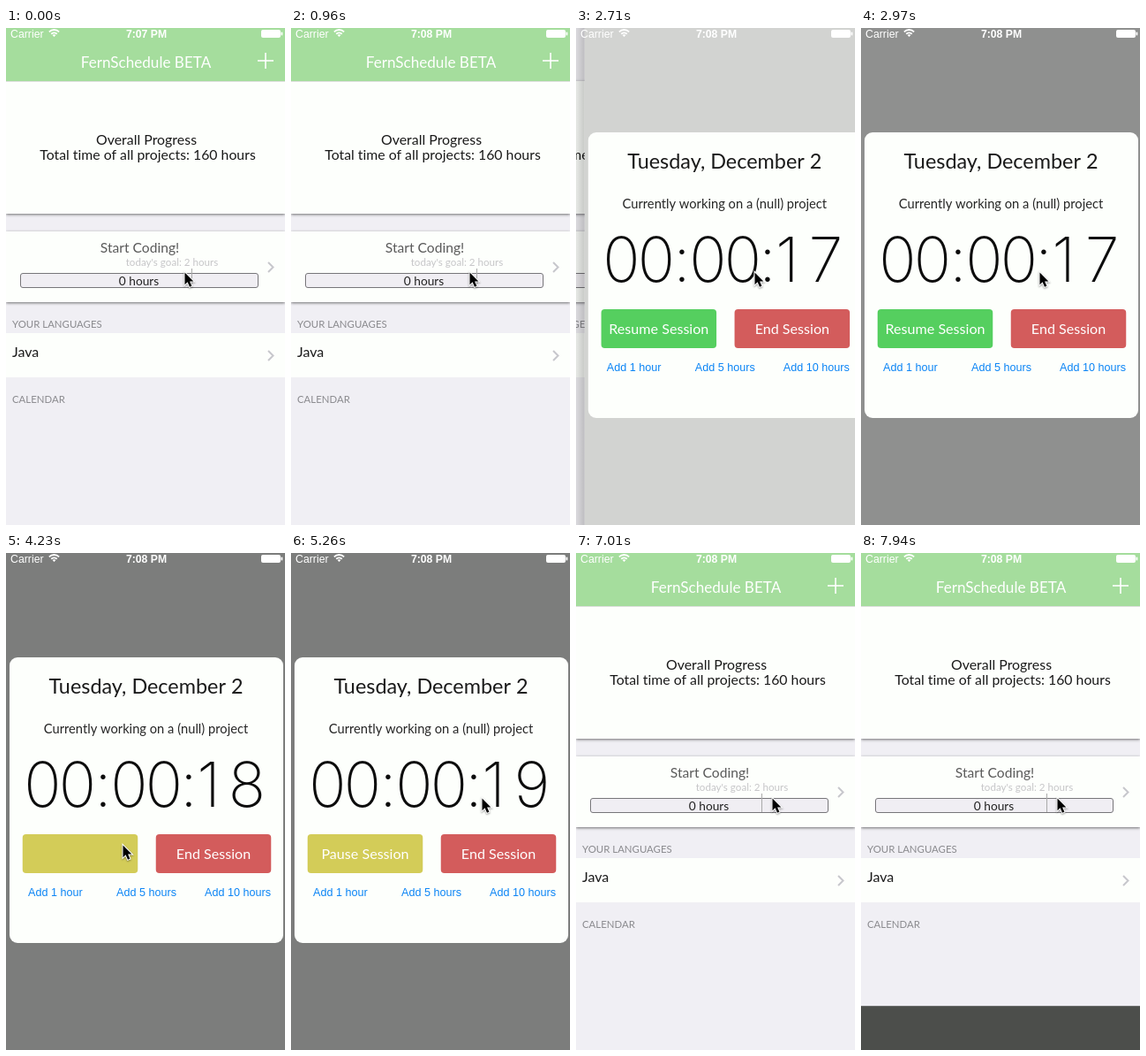
Recreate the animation shown at these times as an HTML page with a canvas. Size 316 by 562 pixels, loop 8 s.

```html
<!DOCTYPE html>
<html lang="en">
<head>
<meta charset="utf-8">
<title>Session timer</title>
<style>
html, body { margin: 0; width: 100%; height: 100%; overflow: hidden; background: #efeff4; }
canvas { display: block; width: 316px; height: 562px; }
</style>
</head>
<body>
<canvas id="stage"></canvas>
<script>
const W = 316, H = 562, LOOP = 8000;
const PUSH = 2420, POP = 6490;
const LATO = 'Lato, "Open Sans", sans-serif';
const ARIAL = '"Liberation Sans", Arial, sans-serif';
const PAPER = '#fdfffc';

const canvas = document.getElementById('stage');
const ctx = canvas.getContext('2d');
const ratio = window.devicePixelRatio || 1;
canvas.width = W * ratio;
canvas.height = H * ratio;

const clamp = v => Math.max(0, Math.min(1, v));
const ramp = (t, a, b) => clamp((t - a) / (b - a));
const mix = (a, b, k) => a + (b - a) * k;

// Critically damped spring used for navigation slides
function slide(ms) {
  if (ms <= 0) return 0;
  if (ms >= 500) return 1;
  const u = ms * 0.01826;
  return 1 - (1 + u) * Math.exp(-u);
}

function rect(x, y, w, h, fill) {
  ctx.fillStyle = fill;
  ctx.fillRect(x, y, w, h);
}

function round(x, y, w, h, r, fill, stroke) {
  ctx.beginPath();
  ctx.roundRect(x, y, w, h, r);
  if (fill) { ctx.fillStyle = fill; ctx.fill(); }
  if (stroke) { ctx.strokeStyle = stroke; ctx.lineWidth = 1; ctx.stroke(); }
}

function text(str, x, y, size, color, align = 'left', weight = 400, family = LATO) {
  ctx.font = `${weight} ${size}px ${family}`;
  ctx.letterSpacing = '0.01px'; // turns ligatures off
  ctx.textAlign = align;
  ctx.fillStyle = color;
  ctx.fillText(str, x, y);
}

function line(color, width, ...pts) {
  ctx.beginPath();
  for (let i = 0; i < pts.length; i += 2) ctx.lineTo(pts[i], pts[i + 1]);
  ctx.strokeStyle = color;
  ctx.lineWidth = width;
  ctx.stroke();
}

function panel(y, h, fill) {
  ctx.save();
  ctx.shadowColor = 'rgba(0,0,0,.55)';
  ctx.shadowBlur = 3 * ratio;
  ctx.shadowOffsetY = ratio;
  rect(0, y, W, h, fill);
  ctx.restore();
}

const chevron = y => line('#c7c7cc', 2, 297, y - 5.5, 302.5, y, 297, y + 5.5);

function drawHome(t) {
  const lit = t >= 2310 && t < 2480;
  rect(0, 0, W, H, '#f0eff4');
  panel(60, 150, PAPER);
  text('Overall Progress', 159, 132, 15.9, '#1a1a1a', 'center');
  text('Total time of all projects: 160 hours', 160.5, 149, 15.8, '#1a1a1a', 'center');

  panel(230, 80, lit ? '#dedadd' : PAPER);
  text('Start Coding!', 151.5, 253.5, 15.6, '#5a5a5a', 'center');
  text("today's goal: 2 hours", 188, 269, 11.6, lit ? '#b5b2b5' : '#c6c6c8', 'center');
  round(16.5, 277.5, 269, 16, 2.5, lit ? null : '#f0eef3', '#77767a');
  line('#aaa', 1, 210.5, 272, 210.5, 293);
  text('0 hours', 150.5, 290.5, 13.7, '#222', 'center');
  chevron(270.5);

  text('YOUR LANGUAGES', 7, 339, 11.4, '#8a8a8e');
  rect(0, 345, W, 50, PAPER);
  text('Java', 7, 372, 16, '#1a1a1a');
  chevron(370.5);
  text('CALENDAR', 7, 424, 11.4, '#8a8a8e');
}

function drawNav() {
  rect(0, 0, W, 60, '#a5dd9d');
  rect(0, 60, W, 0.5, 'rgba(0,0,0,.25)');
  text('FernSchedule BETA', 158.5, 44.5, 17.1, '#fff', 'center');
  line('#fff', 1.6, 285, 37, 303, 37);
  line('#fff', 1.6, 294, 28, 294, 46);
}

function drawTimer(sec) {
  const digits = `00:00:${sec}`;
  const spots = [41.5, 81, 110, 139.5, 179, 207, sec < 20 ? 229.5 : 238, 273];
  spots.forEach((x, i) => text(digits[i], x, 287, 70, '#0c0c0c', 'center', 200, 'Inter, sans-serif'));
}

function button(x, fill, label, ink) {
  round(x, 318, 130.5, 44, 4, fill);
  text(label, x + 65.25, 345.5, 16.1, `rgba(255,255,255,${ink})`, 'center');
}

function drawSession(t) {
  const fadeIn = 1 - (1 - ramp(t, 2600, 3200)) ** 2;
  const dim = 0.51 * fadeIn * (1 - ramp(t, 6300, POP));
  rect(0, 0, W, H, PAPER);
  rect(0, 0, W, H, `rgba(0,0,2,${dim})`);
  round(4, 118, 310, 323, 9, PAPER);
  text('Tuesday, December 2', 158.5, 159, 23.4, '#1a1a1a', 'center');
  text('Currently working on a (null) project', 158.5, 204, 14.7, '#262626', 'center');
  drawTimer(t < 4120 ? 17 : t < 5040 ? 18 : t < 6040 ? 19 : 20);

  const running = t >= 4120;
  const ink = running ? ramp(t, 4270, 4470) : t >= 3940 ? 0.2 : 1;
  if (running) button(18.75, '#d3cc58', 'Pause Session', ink);
  else button(18.75, '#55cf5f', 'Resume Session', ink);
  button(169.75, '#d35c5c', 'End Session', 1);

  [['Add 1 hour', 25], ['Add 5 hours', 125], ['Add 10 hours', 225]].forEach(
    ([label, x]) => text(label, x, 388, 12.6, '#0a84f5', 'left', 400, ARIAL));
}

function drawStatus(t) {
  text('Carrier', 5, 10.5, 12.3, '#fff', 'left', 400, ARIAL);
  text(t < 960 ? '7:07 PM' : '7:08 PM', 159, 10.5, 12.2, '#fff', 'center', 700, ARIAL);
  for (const r of [1.4, 4.6, 8]) {
    ctx.beginPath();
    ctx.arc(54.5, 10, r, -Math.PI * 0.75, -Math.PI * 0.25);
    ctx.strokeStyle = '#fff';
    ctx.lineWidth = r < 2 ? 2.6 : 1.8;
    ctx.stroke();
  }
  round(289, 2, 22, 9, 2, '#fff');
  round(311.5, 4.5, 1.8, 4, 0.9, '#fff');
}

const path = [
  [3130, 202, 276], [3230, 194, 283], [3470, 160, 311], [3710, 132, 330],
  [4650, 132, 330], [4850, 95, 308], [5000, 130, 290], [5260, 216, 277],
  [6480, 216, 277], [6560, 222, 277]
];

function pointerAt(t) {
  const i = path.findIndex(p => p[0] > t);
  if (i === 0) return path[0].slice(1);
  if (i < 0) return path[path.length - 1].slice(1);
  const [a, b] = [path[i - 1], path[i]], k = ramp(t, a[0], b[0]);
  return [mix(a[1], b[1], k), mix(a[2], b[2], k)];
}

function drawPointer(t) {
  ctx.save();
  ctx.translate(...pointerAt(t));
  ctx.shadowColor = 'rgba(0,0,0,.4)';
  ctx.shadowBlur = 2 * ratio;
  ctx.shadowOffsetY = ratio;
  const arrow = new Path2D('M.5 .5V14.2L3.6 11.3L6 16.8L8.4 15.8L6.1 10.4H10.4Z');
  ctx.strokeStyle = '#fff';
  ctx.lineWidth = 2;
  ctx.stroke(arrow);
  ctx.shadowColor = 'transparent';
  ctx.fillStyle = '#000';
  ctx.fill(arrow);
  ctx.restore();
}

function drawBanner(t) {
  const s = (t - 7230) / 1000;
  if (s <= 0) return;
  const y = H - 50 * (1 - Math.exp(-7 * s) * Math.cos(19 * s));
  rect(0, y, W, H - y, '#4c4e4b');
}

function draw(t) {
  ctx.setTransform(ratio, 0, 0, ratio, 0, 0);
  const shown = t < POP ? slide(t - PUSH) : 1 - slide(t - POP);
  const left = W * (1 - shown);

  ctx.save();
  ctx.translate(-95 * shown, 0);
  drawHome(t);
  ctx.restore();

  if (shown > 0) {
    rect(0, 0, left, H, `rgba(0,0,0,${0.1 * shown})`);
    const edge = ctx.createLinearGradient(left - 9, 0, left, 0);
    edge.addColorStop(0, 'rgba(0,0,0,0)');
    edge.addColorStop(1, 'rgba(0,0,0,.13)');
    rect(left - 9, 0, 9, H, edge);
    ctx.save();
    ctx.translate(left, 0);
    drawSession(t);
    ctx.restore();
  }

  if (t < PUSH || t >= POP) drawNav();
  drawBanner(t);
  drawStatus(t);
  drawPointer(t);
}

function tick() {
  draw(performance.now() % LOOP);
  requestAnimationFrame(tick);
}
tick();
</script>
</body>
</html>
```
